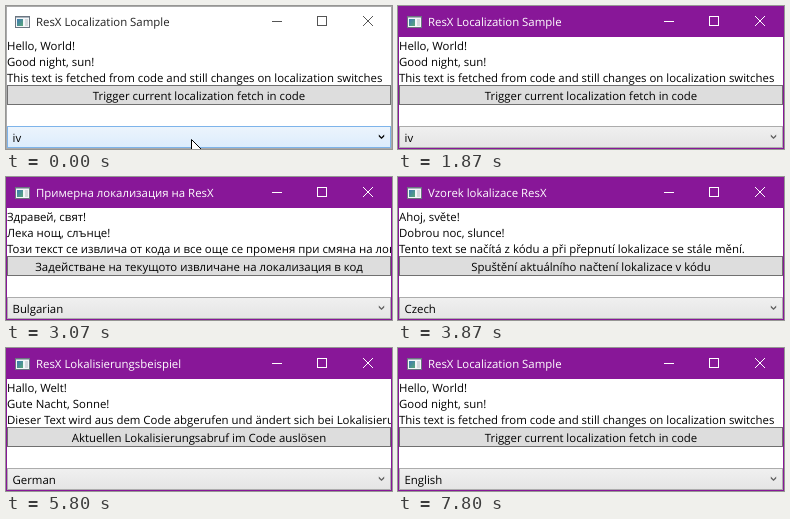
An HTML page that plays this animation: 386x143 px, repeating every 8000 ms.

```html
<!DOCTYPE html>
<html lang="en">
<head>
<meta charset="utf-8">
<title>Localization sample</title>
<style>
  html, body { margin: 0; width: 386px; height: 143px; overflow: hidden; background: #fff; }
  svg { display: block; }
  text { font: 11.4px "Open Sans", "Noto Sans", sans-serif; white-space: pre; text-rendering: geometricPrecision; }
</style>
</head>
<body>
<svg width="386" height="143" viewBox="0 0 386 143">
  <defs>
    <clipPath id="client"><rect x="1" y="31" width="384" height="111"/></clipPath>
    <linearGradient id="comboFill" x1="0" y1="0" x2="0" y2="1">
      <stop id="fillTop" offset="0"/><stop id="fillEnd" offset="1"/>
    </linearGradient>
    <linearGradient id="iconFill" x1="0" y1="0" x2="1" y2="1">
      <stop offset="0" stop-color="#3c78b4"/><stop offset="1" stop-color="#5aa878"/>
    </linearGradient>
  </defs>

  <rect id="frame" width="386" height="143"/>
  <rect id="bar" x="1" y="1" width="384" height="30"/>
  <rect x="1" y="31" width="384" height="111" fill="#fff"/>

  <g>
    <rect x="9.5" y="10.5" width="14" height="11" fill="#f4f6f8" stroke="#6b7580"/>
    <rect x="10" y="11" width="13" height="1" fill="#aab4be"/>
    <rect x="11" y="13" width="6" height="7" fill="url(#iconFill)"/>
    <rect x="19" y="13" width="3" height="7" fill="#d4d9de"/>
  </g>
  <text id="title" x="30" y="20"></text>
  <g id="caption" fill="none">
    <path d="M266 15.5h10M311.5 10.5h9v9h-9z" shape-rendering="crispEdges"/>
    <path d="M357 10l10 10M367 10l-10 10"/>
  </g>

  <g clip-path="url(#client)">
    <text id="hello" x="1" y="44"></text>
    <text id="night" x="1" y="60"></text>
    <text id="fetched" x="1" y="76"></text>
    <rect x="1.5" y="79.5" width="383" height="19" fill="#ddd" stroke="#707070"/>
    <text id="button" x="193" y="94" text-anchor="middle"></text>
    <rect id="combo" x="1.5" y="120.5" width="383" height="21" fill="url(#comboFill)"/>
    <text id="choice" x="6.5" y="136"></text>
    <path id="arrow" d="M372.8 130.4l2.7 2.7 2.7-2.7v-1.8l-2.7 2.7-2.7-2.7z"/>
  </g>
  <rect id="popup" x="1" y="142" width="384" height="1" fill="#646464"/>
  <path id="cursor" d="M185.5 133.5v17l4-4 2.6 6 2.4-1-2.6-6h5.6z" fill="#fff" stroke="#000"/>
</svg>
<script>
const LOOP = 8000;
const el = id => document.getElementById(id);

const english = [
  "ResX Localization Sample", "Hello, World!", "Good night, sun!",
  "This text is fetched from code and still changes on localization switches",
  "Trigger current localization fetch in code"
];
const fields = ["title", "hello", "night", "fetched", "button", "choice"];

const languages = [
  [0, ...english, "iv"],
  [3070, "Примерна локализация на ResX", "Здравей, свят!", "Лека нощ, слънце!",
    "Този текст се извлича от кода и все още се променя при смяна на локализацията",
    "Задействане на текущото извличане на локализация в код", "Bulgarian"],
  [3870, "Vzorek lokalizace ResX", "Ahoj, světe!", "Dobrou noc, slunce!",
    "Tento text se načítá z kódu a při přepnutí lokalizace se stále mění.",
    "Spuštění aktuálního načtení lokalizace v kódu", "Czech"],
  [4930, "ResX lokaliseringsprøve", "Hej, verden!", "Godnat, sol!",
    "Denne tekst hentes fra koden og ændres stadig ved lokaliseringsskift",
    "Udløs nuværende lokaliseringshentning i kode", "Danish"],
  [5800, "ResX Lokalisierungsbeispiel", "Hallo, Welt!", "Gute Nacht, Sonne!",
    "Dieser Text wird aus dem Code abgerufen und ändert sich bei Lokalisierungswechseln",
    "Aktuellen Lokalisierungsabruf im Code auslösen", "German"],
  [6800, "Δείγμα εντοπισμού ResX", "Γεια σου, κόσμε!", "Καληνύχτα, ήλιε!",
    "Αυτό το κείμενο αντλείται από τον κώδικα και εξακολουθεί να αλλάζει",
    "Ενεργοποίηση της τρέχουσας ανάκτησης εντοπισμού στον κώδικα", "Greek"],
  [7800, ...english, "English"]
];

// gradient top, gradient end, border, arrow
const looks = {
  normal: ["#f0f0f0", "#e5e5e5", "#acacac", "#606060"],
  hover: ["#ecf4fc", "#dcecfc", "#7eb4ea", "#000"],
  pressed: ["#daebfc", "#c4e0fc", "#569de5", "#000"]
};
const comboSteps = [[0, "hover"], [670, "pressed"], [1400, "hover"], [1470, "normal"], [2130, "pressed"], [2400, "normal"]];
const popupSteps = [[0, 0], [930, 0.5], [1000, 1], [1870, 0], [2130, 1], [2400, 0]];

const at = (steps, t) => steps.filter(s => s[0] <= t).pop();
const set = (id, name, value) => el(id).setAttribute(name, value);

function draw(t) {
  const active = t >= 670;
  set("frame", "fill", active ? "#881798" : "#aaa");
  set("bar", "fill", active ? "#881798" : "#fff");
  set("title", "fill", active ? "#fff" : "#222");
  set("caption", "stroke", active ? "#fff" : "#555");

  const words = at(languages, t).slice(1);
  fields.forEach((id, i) => { el(id).textContent = words[i]; });

  const [top, end, border, arrow] = looks[at(comboSteps, t)[1]];
  set("fillTop", "stop-color", top);
  set("fillEnd", "stop-color", end);
  set("combo", "stroke", border);
  set("arrow", "fill", arrow);

  set("popup", "opacity", at(popupSteps, t)[1]);
  set("cursor", "visibility", t < 1400 ? "visible" : "hidden");
}

const start = performance.now();
function tick() {
  draw((performance.now() - start) % LOOP);
  requestAnimationFrame(tick);
}
tick();
</script>
</body>
</html>
```
